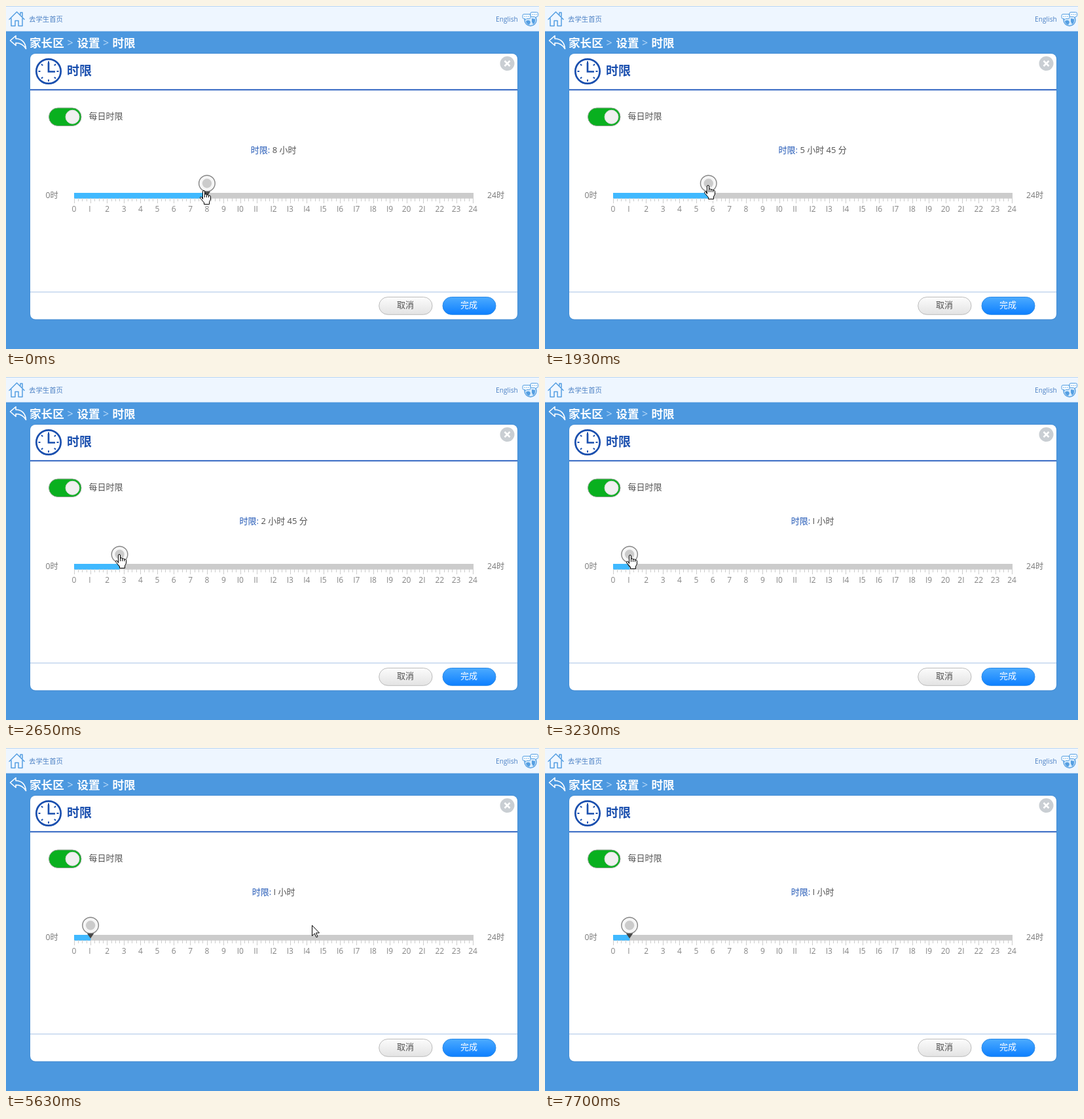
An HTML page for the animation above (8.32 s loop, 814 by 525 pixels).

```html
<!DOCTYPE html>
<html lang="zh-CN">
<head>
<meta charset="utf-8">
<title>时限</title>
<style>
html, body { margin: 0; height: 100%; overflow: hidden; background: #4c98df; }
svg { display: block; }
text { font: 13px "Open Sans", "Noto Sans CJK SC", "Noto Sans CJK", sans-serif; fill: #505050; }
.mid text, text.mid { text-anchor: middle; }
.crumb text { font-size: 17.6px; font-weight: 700; fill: #fff; }
.crumb .sep { font-size: 16px; font-weight: 400; fill: #b9daf8; }
.line { fill: none; stroke: #559fe2; stroke-width: 1.5; stroke-linejoin: round; stroke-linecap: round; }
</style>
</head>
<body>
<svg width="814" height="525" viewBox="0 0 814 525">
  <defs>
    <linearGradient id="blue" x2="0" y2="1"><stop stop-color="#4cabff"/><stop offset="1" stop-color="#0d7fff"/></linearGradient>
    <linearGradient id="hover" x2="0" y2="1"><stop stop-color="#2f97fb"/><stop offset="1" stop-color="#0870e8"/></linearGradient>
    <linearGradient id="grey" x2="0" y2="1"><stop stop-color="#fcfcfc"/><stop offset="1" stop-color="#e3e3e3"/></linearGradient>
  </defs>

  <!-- top bar -->
  <rect width="814" height="38.5" fill="#eef6ff"/>
  <path d="M0 .5H814M0 38.5H814" stroke="#b9d5f2"/>
  <path class="line" d="M5 20.5 16.5 9 28 20.5M8 19V30.5H14V22.5H19V30.5H25V19M22 13V10H25V16"/>
  <text x="35" y="23.7" style="font-size:10.4px;fill:#4a7fc4">去学生首页</text>
  <text x="748" y="23.7" style="font-size:10.2px;fill:#4a7fc4">English</text>
  <circle cx="801" cy="21.5" r="9" fill="#d9ecfd" stroke="#559fe2" stroke-width="1.4"/>
  <path d="M796 22q4-1 5 3l-2 4q-5-2-5-6zM803 19l5 1q1 5-3 8l-2-4z" fill="#559fe2"/>
  <g fill="#f4faff" stroke="#559fe2">
    <path d="M791 12.5h8q2 0 2 2v3q0 2-2 2h-4l-2 2v-2h-2q-2 0-2-2v-3q0-2 2-2z"/>
    <path d="M803 9.5h7.500q2 0 2 2v3q0 2-2 2h-1v2l-2-2h-4.500q-2 0-2-2v-3q0-2 2-2z"/>
    <path d="M791.500 16h7M803.500 13h7" stroke-dasharray="1.400 1.400"/>
  </g>

  <!-- breadcrumb -->
  <path d="M6.500 53 15 45.500V50Q29 50.500 30.500 65.500 25 56.500 15 56.500V60.500Z" fill="none" stroke="#fff" stroke-width="1.600" stroke-linejoin="round"/>
  <g class="crumb">
    <text x="36" y="63">家长区</text><text class="sep" x="93.500" y="62">&gt;</text>
    <text x="108.500" y="63">设置</text><text class="sep" x="148" y="62">&gt;</text>
    <text x="162.500" y="63">时限</text>
  </g>

  <!-- panel -->
  <rect x="36" y="72" width="746" height="409" rx="9" fill="#3f86cb" opacity=".5"/>
  <rect x="37" y="73" width="744" height="406.500" rx="8" fill="#fff"/>
  <path d="M37 128.300H781" stroke="#2e63c0" stroke-width="2"/>
  <path d="M37 437.800H781" stroke="#c3d6ee" stroke-width="1.400"/>
  <g fill="none" stroke="#1a4fae">
    <circle cx="65" cy="100" r="18.700" stroke-width="2.700"/>
    <path d="M65 87V100.500H75" stroke-width="2.700"/>
    <path id="dial" stroke-width="2"/>
  </g>
  <text x="93" y="106" style="font-size:19px;font-weight:700;fill:#1a4fae">时限</text>
  <circle cx="765.500" cy="88" r="11" fill="#c9ced3"/>
  <path d="M761.500 84l8 8m0-8-8 8" stroke="#fff" stroke-width="2.600"/>

  <rect x="65.500" y="156" width="49.500" height="27.500" rx="13.750" fill="#09b01f" stroke="#8fa391"/>
  <circle cx="101.500" cy="169.800" r="10.500" fill="#f0f0f0" stroke="#d2d8d2"/>
  <text x="126.500" y="172.700">每日时限</text>

  <!-- slider -->
  <text class="mid" x="408.700" y="224.600"><tspan fill="#1f56b5">时限:</tspan><tspan id="value"></tspan></text>
  <g style="font-size:12px">
    <text x="60.500" y="294.300" style="font-size:12.200px;fill:#777">0时</text>
    <text x="735" y="294.300" style="font-size:12.200px;fill:#777">24时</text>
  </g>
  <rect x="104" y="286" width="610" height="8.700" fill="#ccc"/>
  <rect id="fill" x="104" y="286" height="8.700" fill="#40b9ff"/>
  <path id="ticks" stroke="#ccc"/>
  <g id="labels" class="mid"></g>
  <g id="handle">
    <path d="M-5.500 283.500h11L0 291.500z" fill="#444"/>
    <circle cy="271.500" r="12.300" fill="#f6f6f6" stroke="#858585" stroke-width="1.400"/>
    <circle cy="271.500" r="7.200" fill="#cbcbcb"/>
  </g>

  <!-- buttons -->
  <g class="mid">
    <rect x="569.700" y="445.500" width="81.300" height="26.800" rx="13.400" fill="url(#grey)" stroke="#bcbcbc"/>
    <text x="610" y="461.800">取消</text>
    <rect id="done" x="667" y="445.500" width="81" height="26.800" rx="13.400" stroke="#2b8ae8"/>
    <text x="707" y="461.800" style="fill:#fff">完成</text>
  </g>

  <g id="cursor" fill="#fff" stroke="#000" stroke-linejoin="round">
    <path id="hand" d="M-1.500 13.500V2Q-1.500.500 0 .500T1.500 2V6H3.500Q4.500 6 4.500 7H6.500Q7.500 7 7.500 8H8.500Q10.500 8 10.500 10V14L8.500 18V21.500H.500V19L-5 12.500Q-6 10.500-4.500 10T-1.500 13.500M1.500 6V11M4.500 7V11M7.500 8V11"/>
    <path id="arrow" d="M.500.500V16.500L4.300 13 7 18.700 9 17.700 6.500 12H11.500Z"/>
    <path id="beam" fill="none" d="M-3 -7.500H-1L.500-6.500 2-7.500H4M.500-6.500V6.500M-3 7.500H-1L.500 6.500 2 7.500H4"/>
  </g>
</svg>
<script>
const LOOP = 8320, X0 = 104, HOUR = 25.4;
const $ = id => document.getElementById(id);
// The typeface shows the digit one as a plain bar.
const digits = n => String(n).replace(/1/g, 'I');

// Bursts of movement: first step, last step, number of steps
const bursts = [
  [0, 0, 1], [120, 170, 2], [370, 370, 1], [610, 670, 2], [980, 980, 1],
  [1280, 2110, 15], [2170, 3000, 15], [3060, 3230, 4], [3730, 4560, 15],
  [4620, 5150, 9], [5580, 5930, 7], [6110, 6350, 5], [6410, 6770, 6], [7640, 7700, 2]
];

// Pointer path: time, x, y
const path = [
  [0, 302, 282], [120, 306, 286], [170, 309, 290], [370, 308, 289],
  [610, 307, 280], [670, 306, 270], [980, 307, 270], [1220, 307, 270],
  [1930, 249, 274], [2110, 237, 274], [2650, 172, 271], [3000, 142, 272],
  [3230, 130, 272], [3670, 130, 272], [4560, 384, 228], [4680, 403, 227],
  [5150, 454, 224], [5520, 454, 224], [5870, 527, 500], [6110, 735, 508],
  [6350, 732, 483], [6770, 712, 458], [7640, 725, 495], [LOOP, 725, 495]
];

function stepTime(t) {
  const [a, b, n] = bursts.findLast(s => s[0] <= t);
  const d = (b - a) / (n - 1 || 1) || 60;
  return a + Math.min(n - 1, Math.floor((t - a) / d + 0.1)) * d;
}

function pointer(t) {
  const i = Math.max(1, path.findIndex(p => p[0] >= t));
  const [a, b] = [path[i - 1], path[i]];
  const k = (t - a[0]) / (b[0] - a[0]);
  return [1, 2].map(j => Math.round(a[j] + (b[j] - a[j]) * k));
}

function hoursAt(t) {
  if (t < 1280) return 8;
  const x = pointer(Math.min(t, 3230))[0];
  return Math.round((x - X0) / HOUR * 4) / 4;
}

function draw(now) {
  const t = stepTime(now % LOOP);
  const [x, y] = pointer(t);
  const hours = hoursAt(t), hx = X0 + HOUR * hours;
  const minutes = hours % 1 * 60;
  const inside = (l, top, r, b) => x > l && x < r && y > top && y < b;

  $('value').textContent = ` ${digits(Math.floor(hours))} 小时` + (minutes ? ` ${digits(minutes)} 分` : '');
  $('fill').setAttribute('width', hx - X0);
  $('handle').setAttribute('transform', `translate(${hx - 0.3})`);

  const hidden = t > 5925 && t < 6109 || t > 7690;
  const onDone = !hidden && inside(667, 445, 748, 473);
  $('done').setAttribute('fill', `url(#${onDone ? 'hover' : 'blue'})`);

  const kind = onDone || inside(hx - 13, 258, hx + 13, 293) ? 'hand'
    : inside(372, 212, 445, 231) ? 'beam' : 'arrow';
  for (const id of ['hand', 'arrow', 'beam'])
    $(id).style.display = !hidden && id === kind ? '' : 'none';
  $('cursor').setAttribute('transform', `translate(${x} ${y})`);
}

let ticks = '', labels = '', dial = '';
for (let q = 0; q <= 96; q++)
  ticks += `M${Math.round(X0 + q * HOUR / 4 - 0.5) + 0.5} 294V${q % 4 ? 299 : 302}`;
for (let h = 0; h <= 24; h++) {
  const x = X0 + h * 25.375 - (h % 10 === 1 ? 1.5 : 0);
  labels += `<text x="${x}" y="315" style="font-size:12px;fill:#858585">${digits(h)}</text>`;
}
for (let i = 0; i < 8; i++) {
  const c = Math.cos(i * Math.PI / 4), s = Math.sin(i * Math.PI / 4);
  dial += `M${65 + 12.5 * c} ${100 + 12.5 * s}L${65 + 15.5 * c} ${100 + 15.5 * s}`;
}
$('ticks').setAttribute('d', ticks);
$('labels').innerHTML = labels;
$('dial').setAttribute('d', dial);

function frame() {
  draw(performance.now());
  requestAnimationFrame(frame);
}
frame();
</script>
</body>
</html>
```
